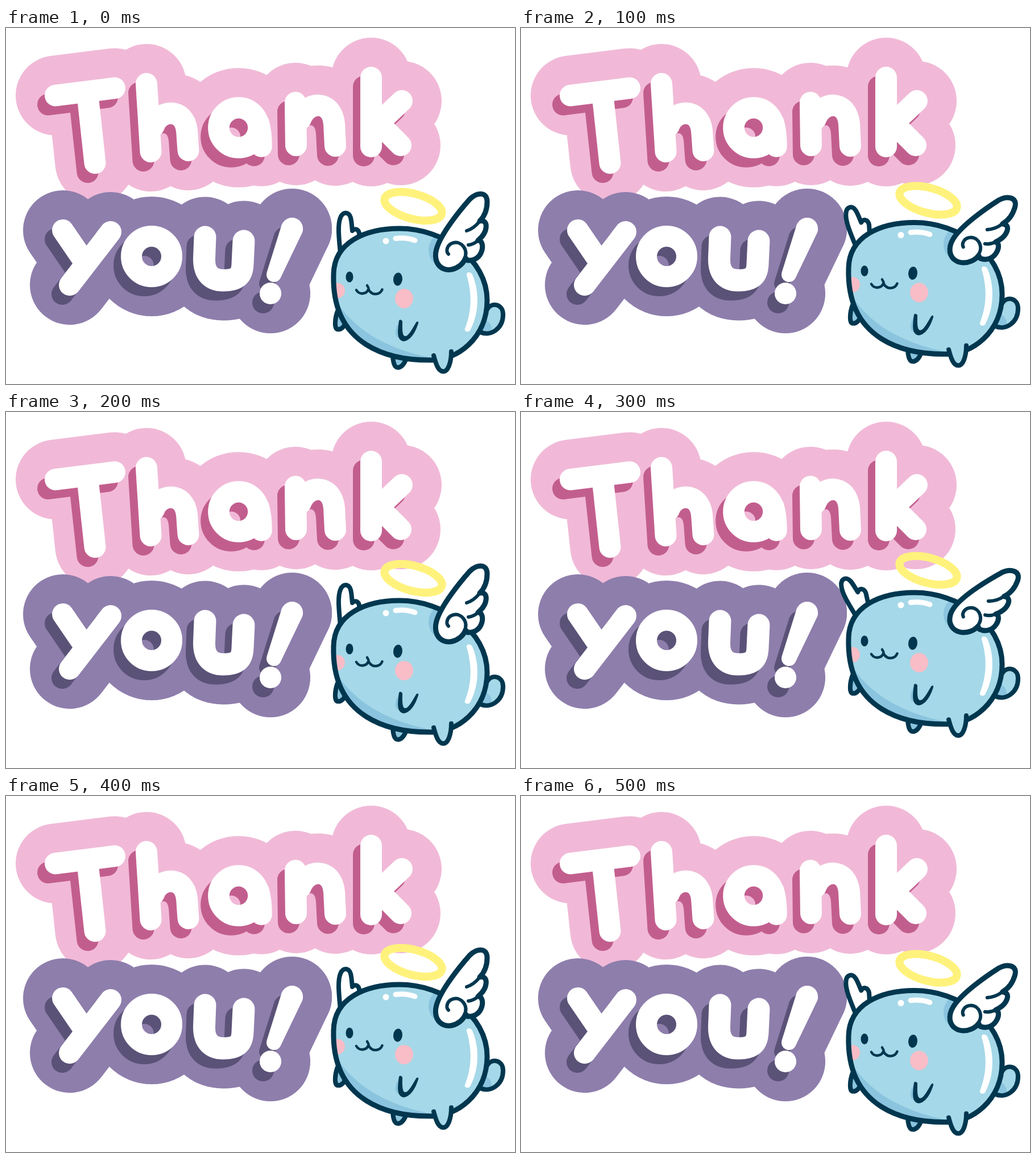
Write an HTML page with a canvas that moves like this. It is 895 px wide and 625 px high and loops after 0.6 s.

```html
<!DOCTYPE html>
<html lang="en">
<head>
<meta charset="utf-8">
<title>Thank you!</title>
<style>
  html, body { margin: 0; width: 100%; height: 100%; overflow: hidden; background: #fff; }
  canvas { display: block; }
</style>
</head>
<body>
<canvas id="stage" width="895" height="625" role="img" aria-label="Thank you!"></canvas>
<script>
const ctx = document.getElementById('stage').getContext('2d');
const TAU = Math.PI * 2;
const NAVY = '#00374f', SKY = '#a5d8e8', SHADE = '#8ac4de', BLUSH = '#f8bdc7';

// Lettering: [centre line, pen radius]
const thank = [
  ['M87 118.5L191 105.5M143 113L156.5 237', 19],
  ['M247 98L254.5 217M260 172C270 142 314 140 318 180L320.5 215', 19],
  ['M374 175A35 35 0 1 1 444 175A35 35 0 1 1 374 175M444 166Q449 182 449 208', 18.8],
  ['M509 131L510 206M518 160C530 127 573 126 577 168L579 207', 19],
  ['M642 87L642 208M696 128L655 167L694 206', 19]
];
const you = [
  ['M100 355L139 412M184 358L112 451', 19],
  ['M220.5 401A35.5 35.5 0 1 1 291.5 401A35.5 35.5 0 1 1 220.5 401', 18.5],
  ['M350 367L348.5 405C348 432 362 443 382 443C402 443 415 438 416 415L418 374', 19.5],
  ['M503 352L503.1 352', 19],
  ['M497 350L509 354L471 433Z', 13],
  ['M465 466L465.1 466', 19]
];

const path = d => new Path2D(d);
const shape = {
  body: path('M576 432C577 376 632 352 692 352C768 352 846 405 846 478C846 545 792 584 748 583C676 584 572 560 576 432Z'),
  light: path('M560 440C590 515 650 560 752 580L770 600L900 600L900 300L560 300Z'),
  shine: path('M810 434C809 428 817 427 820 433C832 460 833 500 816 531C813 535 805 533 807 528C820 495 819 465 810 434Z'),
  mouth: path('M616 460Q620 467 628 466Q635 465 637 459M635 452Q638 456 638 460Q643 468 651 467Q659 466 661.5 459'),
  hand: path('M691 514C689 530 686 548 699 550C712 549 721 532 725 518C726 515 723 514 721 517C715 527 708 541 702 541C696 541 697 525 697 515C696 512 692 511 691 514Z'),
  handShade: path('M692 514Q680 535 688 543L697 545Z'),
  backArm: path('M583 497C578 510 577 528 583 529C590 530 594 524 598 517'),
  backLeg: path('M680 576C681 590 684 597 690 596C697 595 701 588 704 580'),
  frontLeg: path('M752 575C756 590 760 603 769 603C778 603 783 585 783 568'),
  tail: path('M846 494C855 480 874 485 874 503C874 528 852 542 834 534'),
  farWing: path('M588 396C585 365 583 345 588 333C592 322 603 322 606 333C608 341 608 348 609 356C615 350 622 355 621 364L616 385'),
  wing: path('M757 388C765 360 800 318 815 301C827 289 846 286 846 305C846 320 841 331 833 339C848 335 849 357 830 373C843 371 841 410 812 408L808 404C800 424 770 434 758 412C754 403 755 395 757 388Z'),
  wingLines: path('M833 339Q823 352 810 356M830 373Q822 380 813 381M806 406C814 388 800 374 787 377C775 380 773 392 778 397')
};

function fill(p, color) {
  ctx.fillStyle = color;
  ctx.fill(p);
}

function line(p, width, color = NAVY) {
  ctx.lineWidth = width;
  ctx.strokeStyle = color;
  ctx.stroke(p);
}

function limb(p, color, width) {
  fill(p, color);
  line(p, width);
}

function oval(x, y, rx, ry, color, tilt = 0) {
  ctx.beginPath();
  ctx.ellipse(x, y, rx, ry, tilt, 0, TAU);
  ctx.fillStyle = color;
  ctx.fill();
}

function turned(x, y, deg, draw) {
  ctx.save();
  ctx.translate(x, y);
  ctx.rotate(deg * Math.PI / 180);
  ctx.translate(-x, -y);
  draw();
  ctx.restore();
}

function word(letters, back, shadow) {
  const pen = (pad, color) => letters.forEach(([d, r]) => line(path(d), 2 * (r + pad), color));
  pen(51, back);
  ctx.save();
  ctx.translate(-13, 16);
  pen(0, shadow);
  ctx.restore();
  pen(0, '#fff');
}

function bodyParts() {
  limb(shape.backArm, SHADE, 8);
  limb(shape.backLeg, SHADE, 8);

  ctx.save();
  ctx.clip(shape.tail);
  fill(shape.tail, SKY);
  oval(838, 530, 16, 18, SHADE);
  ctx.restore();
  line(shape.tail, 8);

  ctx.save();
  ctx.clip(shape.body);
  fill(shape.body, SHADE);
  fill(shape.light, SKY);
  oval(766, 390, 23, 28, SHADE);
  oval(583, 461, 13, 13.5, BLUSH);
  ctx.restore();
  line(shape.body, 9);
  limb(shape.frontLeg, SKY, 8);
}

function details() {
  oval(668, 374, 5.5, 5.5, '#fff');
  line(path('M685 369.5Q703 367 719 373'), 9, '#fff');
  fill(shape.shine, '#fff');

  oval(604, 437, 6.5, 9.5, NAVY);
  oval(689, 441, 8, 11.5, NAVY, 0.1);
  oval(700, 475, 16, 17, BLUSH);
  line(shape.mouth, 4.5);
  fill(shape.handShade, SHADE);
  fill(shape.hand, NAVY);
}

function halo() {
  ctx.beginPath();
  ctx.ellipse(716, 313, 52, 22, 0.26, 0, TAU);
  ctx.lineWidth = 14;
  ctx.strokeStyle = '#fff27c';
  ctx.stroke();
}

// Rise and wing spread for the steps from the lowest to the highest pose
const poses = [
  { rise: 0, near: 0, far: 0 },
  { rise: 10.5, near: 16, far: -17 },
  { rise: 21, near: 0, far: 0 },
  { rise: 35, near: 20, far: -26 }
];

function draw(ms) {
  const step = Math.floor(ms / 100) % 6;
  const { rise, near, far } = poses[step < 4 ? step : 6 - step];

  ctx.fillStyle = '#fff';
  ctx.fillRect(0, 0, 895, 625);
  ctx.lineCap = ctx.lineJoin = 'round';
  word(thank, '#f1b9d7', '#c25e8e');
  word(you, '#8e7eac', '#5b5277');

  ctx.save();
  ctx.translate(0, -rise);
  turned(590, 390, far, () => limb(shape.farWing, '#fff', 8));
  bodyParts();
  details();
  turned(785, 395, near, () => {
    limb(shape.wing, '#fff', 9);
    line(shape.wingLines, 6);
  });
  halo();
  ctx.restore();
}

const start = performance.now();
function tick() {
  draw(performance.now() - start);
  requestAnimationFrame(tick);
}
tick();
</script>
</body>
</html>
```
